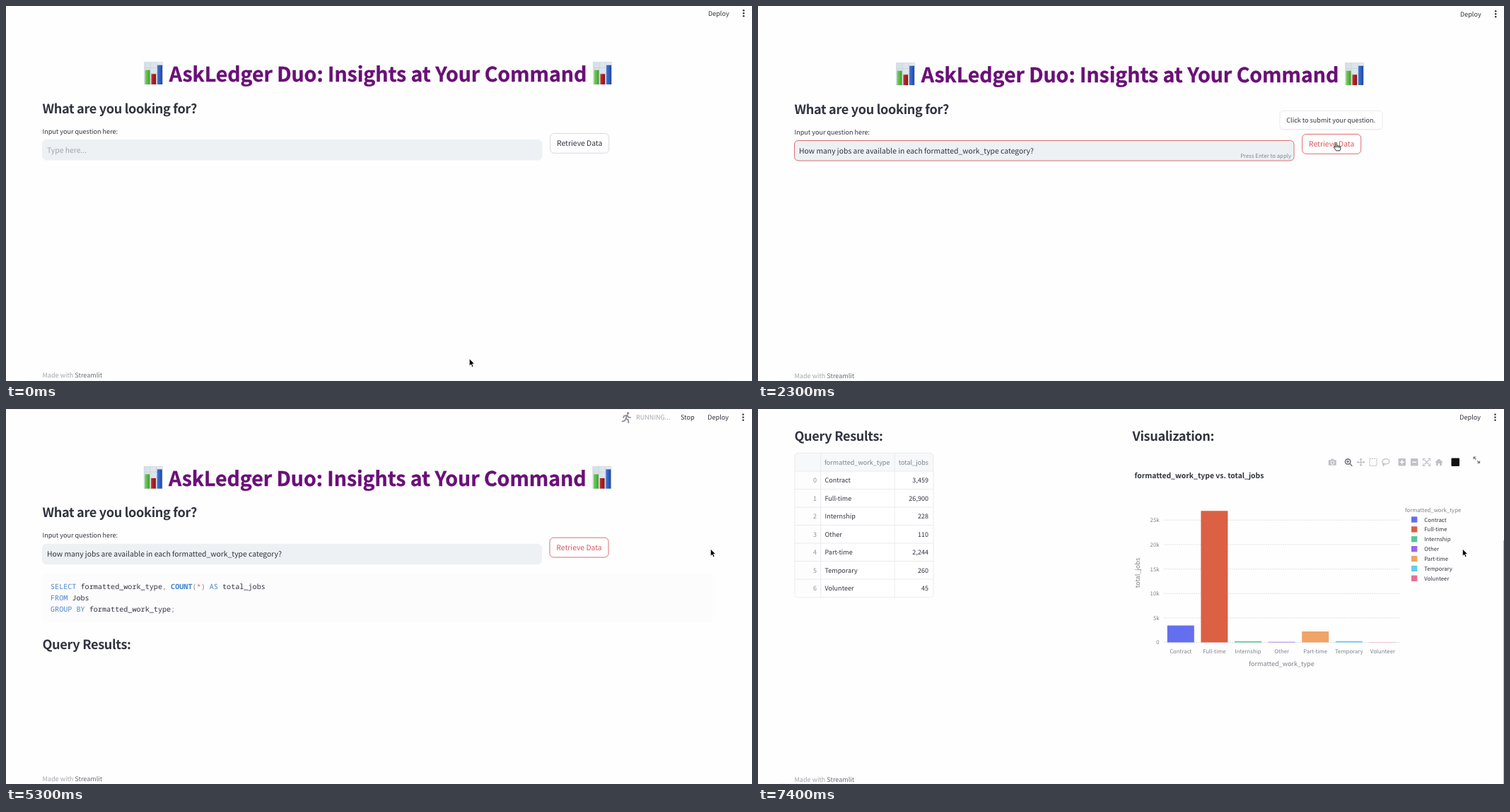
An HTML page for the animation above (8 s loop, 1055 px wide and 531 px high).

```html
<!DOCTYPE html>
<html lang="en">
<head>
<meta charset="utf-8">
<title>Data query app</title>
<style>
html, body { margin: 0; width: 100%; height: 100%; overflow: hidden; background: #fefefe; }
svg { display: block; width: 1055px; height: 531px; }
text {
  font-family: "Noto Sans CJK SC", "Noto Sans CJK JP", "Noto Sans CJK KR", Lato, sans-serif;
  text-rendering: geometricPrecision;
  white-space: pre;
}
text.code { font-family: "Noto Sans Mono", "DejaVu Sans Mono", monospace; }
.scene { visibility: hidden; }
.scene.on { visibility: visible; }
</style>
</head>
<body>
<svg id="stage" viewBox="0 0 1055 531" xmlns="http://www.w3.org/2000/svg"></svg>
<script>
const INK = '#31333f', GREY = '#7f8189', RED = '#d5565a', RIM = '#db6d70', KEY = '#4c86c9';
const PURPLE = '#6a1077';
const SIZE = { title: 28.5, head: 18.15, body: 10.37, label: 9.07, tiny: 7.78 };

const attrs = o => Object.entries(o).map(([k, v]) => ` ${k}="${v}"`).join('');
const text = (x, y, str, size, fill = INK, more = {}) =>
  `<text${attrs({ x, y, 'font-size': size, fill, ...more })}>${str}</text>`;
const rect = (x, y, width, height, fill, more = {}) =>
  `<rect${attrs({ x, y, width, height, fill, ...more })}/>`;
const path = (d, more = {}) => `<path${attrs({ d, fill: 'none', ...more })}/>`;
const group = (x, y, body) => `<g transform="translate(${x} ${y})">${body}</g>`;
const END = { 'text-anchor': 'end' }, MID = { 'text-anchor': 'middle' };

const heading = (x, y, str) =>
  text(x, y, str, SIZE.head, INK, { 'font-weight': 600, 'letter-spacing': -0.35 });

const chartIcon = (x, y) => group(x, y,
  rect(0.5, 0.5, 26, 31.5, 'url(#panel)', { stroke: '#cbd3db', 'stroke-width': 0.6 }) +
  path('M1 8.5H26M1 16.5H26M1 24.5H26M9 1V32M18 1V32', { stroke: '#c3ced8', 'stroke-width': 0.6 }) +
  rect(1.7, 11.7, 6.8, 20.3, 'url(#green)') +
  rect(10.5, 17.3, 6.7, 14.7, 'url(#red)') +
  rect(19, 4.7, 7.1, 27.3, 'url(#blue)'));

const arrow = (x, y) => group(x, y, path(
  'M0 0V10.6L2.4 8.4L4 12.2L5.9 11.4L4.3 7.7H7.5Z',
  { fill: '#000', stroke: '#fff', 'stroke-width': 0.9, 'stroke-linejoin': 'round' }));

const hand = (x, y) => group(x, y, path(
  'M2.5 7V1.2Q2.5 0 3.5 0T4.5 1.2V4.5Q5.5 3.8 6.3 4.9Q7.4 4.2 8.1 5.4Q9.7 5 9.8 6.6V8.6Q9.6 10 8.9 11.6H3.6Q2.8 9.9 .5 7.4Q-.2 6.2 1 6Q1.8 6 2.5 7ZM4.5 4.5V7M6.3 5V7.2M8.1 5.4V7.4',
  { fill: '#fff', stroke: '#222', 'stroke-width': 0.95, 'stroke-linejoin': 'round' }));

const runner = group(871, 4,
  '<circle cx="8.6" cy="2" r="1.8" fill="#8d8f96"/>' +
  path('M7.6 4.6L5.6 9.6M7.4 5L3.5 5.6L2 8M7.6 5L9.6 7.8L12 8.2M5.6 9.6L9 11.6L9.4 15.4M5.6 9.6L4 12.6L.6 13.6',
    { stroke: '#8d8f96', 'stroke-width': 1.8, 'stroke-linecap': 'round', 'stroke-linejoin': 'round' }));

const menu = (x, y) => text(x, y + 3.4, 'Deploy', SIZE.label) +
  [-4, 0, 4].map(d => `<circle cx="${x + 50.2}" cy="${y + d}" r="1.25" fill="${INK}"/>`).join('');

const footer = y => text(51.5, y,
  `Made with <tspan fill="#6c6e78">Streamlit</tspan>`, SIZE.label, '#a4a6ad');

// Form shared by the first three scenes; dx shifts the right-hand parts.
function form(dy, dx, { question, active, hot }) {
  const tone = hot ? RED : INK;
  return group(0, dy,
    chartIcon(195 + dx / 2, 79) + chartIcon(830 + dx, 79) +
    text(526 + dx, 107.3, 'AskLedger Duo: Insights at Your Command', SIZE.title, PURPLE,
      { ...MID, 'font-weight': 700, 'letter-spacing': -0.05, stroke: PURPLE, 'stroke-width': 0.35 }) +
    heading(51.5, 151.8, 'What are you looking for?') +
    text(51.5, 180.6, 'Input your question here:', SIZE.label) +
    rect(51.5, 189.5, 706.5 + dx, 28.5, '#edf1f4',
      { rx: 5.5, stroke: active ? RIM : '#edf1f4', 'stroke-width': 1 }) +
    text(58, 207.6, question || 'Type here...', SIZE.body, question ? INK : '#a1a4ab') +
    (active ? text(754, 214.2, 'Press Enter to apply', SIZE.tiny, '#82858d', END) : '') +
    rect(769.7 + dx, 180.5, 83, 27.8, '#fff',
      { rx: 5.5, stroke: hot ? RIM : '#d8d9dc', 'stroke-width': 1 }) +
    text(811.2 + dx, 198.3, 'Retrieve Data', SIZE.body, tone, MID));
}

const tooltip =
  rect(738, 149.5, 145, 26.5, '#000', { rx: 5, opacity: 0.04 }) +
  rect(738, 148.5, 145, 26, '#fff', { rx: 5, stroke: '#e9eaed', 'stroke-width': 1 }) +
  text(747.3, 164.9, 'Click to submit your question.', SIZE.label);

function sql() {
  const span = (str, fill, bold) =>
    `<tspan fill="${fill}"${bold ? ' font-weight="700"' : ''}>${str}</tspan>`;
  const key = str => span(str, KEY), mark = str => span(str, '#85888f');
  const lines = [
    key('SELECT') + ' formatted_work_type' + mark(',') + ' ' + span('COUNT', '#3c80d2', true) +
      mark('(') + span('*', '#dc7a45') + mark(')') + ' ' + key('AS') + ' total_jobs',
    key('FROM') + ' Jobs',
    key('GROUP BY') + ' formatted_work_type' + mark(';')
  ];
  return rect(51.5, 232.5, 948, 70.5, '#fcfcfd', { rx: 5 }) +
    lines.map((s, i) => text(63, 254.6 + i * 16.1, s, 10.13, INK, { class: 'code' })).join('');
}

const jobs = [
  ['Contract', 3459, '#646ff0'],
  ['Full-time', 26900, '#db6044'],
  ['Internship', 228, '#56c59b'],
  ['Other', 110, '#9868e6'],
  ['Part-time', 2244, '#f0a466'],
  ['Temporary', 260, '#66cdeb'],
  ['Volunteer', 45, '#e56f92']
];

function table() {
  const line = { stroke: '#e8e9ed', 'stroke-width': 0.9 };
  let out = rect(52, 62.3, 196, 204.5, '#fff', { rx: 4.5 }) +
    path('M52 88V66.8Q52 62.3 56.5 62.3H243.5Q248 62.3 248 66.8V88Z', { fill: '#f7f8fa' }) +
    rect(52.3, 88, 36.5, 174, '#fdfdfd') +
    text(94, 78.6, 'formatted_work_type', SIZE.label, GREY) +
    text(241, 78.6, 'total_jobs', SIZE.label, GREY, END);
  jobs.forEach(([name, n], i) => {
    const y = 88 + i * 25.5;
    out += path(`M52 ${y}H248`, line) +
      text(83, y + 16, i, SIZE.label, '#92949c', END) +
      text(94.5, y + 16, name, SIZE.label) +
      text(241, y + 16, n.toLocaleString('en-US'), SIZE.label, INK, END);
  });
  return out + path('M88.8 62.3V266.8M193.2 62.3V266.8', line) +
    rect(52, 62.3, 196, 204.5, 'none', { rx: 4.5, ...line });
}

function chart() {
  const base = 330.5, unit = 34.62 / 5000;
  let out = text(532.5, 98, 'formatted_work_type vs. total_jobs', SIZE.body, INK,
    { 'font-weight': 600 });
  for (let k = 0; k <= 25; k += 5) {
    const y = base - k * 1000 * unit;
    out += path(`M574 ${y}H908`, { stroke: '#dcdee3', 'stroke-width': 0.9, 'stroke-dasharray': '2 1' }) +
      text(567.5, y + 2.9, k ? k + 'k' : 0, SIZE.tiny, GREY, END);
  }
  jobs.forEach(([name, n, fill], i) => {
    const x = 597.8 + i * 47.6, y = 156.6 + i * 13.87;
    out += rect(x - 19, base - n * unit, 38, n * unit, fill) +
      text(x, 346, name, SIZE.tiny, GREY, MID) +
      rect(924, y - 4.2, 8.3, 8.3, fill) +
      text(942.3, y + 3, name, SIZE.tiny);
  });
  return out + text(915, 145.8, 'formatted_work_type', SIZE.tiny, GREY) +
    text(740.5, 364.2, 'formatted_work_type', SIZE.label, GREY, MID) +
    text(0, 0, 'total_jobs', SIZE.label, GREY, { ...MID, transform: 'translate(540 232) rotate(-90)' });
}

function toolbar() {
  const c = '#bfc1c6', line = { stroke: c, 'stroke-width': 1.3 };
  const at = (x, body) => group(x, 75.3, body);
  return at(812.3,
      path('M-5.5-3H-2.5L-1.5-4.5H1.5L2.5-3H5.5V4.5H-5.5Z', { fill: c }) +
      '<circle cy=".7" r="2.3" fill="none" stroke="#fff"/>') +
    at(835,
      '<circle cx="-.8" cy="-.8" r="3.7" fill="none" stroke="#777a82" stroke-width="1.7"/>' +
      path('M2 2L5.4 5.4M-2.6-.8H1M-.8-2.6V1', { stroke: '#777a82', 'stroke-width': 1.6 })) +
    at(852.6,
      path('M-5 0H5M0-5V5', line) +
      path('M-6 0L-3.4-2V2ZM6 0L3.4-2V2ZM0-6L-2-3.4H2ZM0 6L-2 3.4H2Z', { fill: c })) +
    at(870, rect(-5, -5, 10, 10, 'none', { ...line, 'stroke-dasharray': '2 1' })) +
    at(887.5,
      '<ellipse cx=".4" cy="-1" rx="5" ry="3.6" fill="none" stroke="#bfc1c6" stroke-width="1.3"/>' +
      path('M-3.6 1.2Q-5 4-2 3.2Q-2.4 5-3.4 5.8', line)) +
    at(910.7, rect(-5.2, -5.2, 10.4, 10.4, c, { rx: 1 }) +
      path('M-3 0H3M0-3V3', { stroke: '#fff', 'stroke-width': 1.5 })) +
    at(928.2, rect(-5.2, -5.2, 10.4, 10.4, c, { rx: 1 }) +
      path('M-3 0H3', { stroke: '#fff', 'stroke-width': 1.5 })) +
    at(945.6, path('M-5-2V-5H-2M2-5H5V-2M5 2V5H2M-2 5H-5V2M-3.4-3.4L3.4 3.4M3.4-3.4L-3.4 3.4', line)) +
    at(963, path('M0-5L5.8.3H4V5H1.2V1.6H-1.2V5H-4V.3H-5.8Z', { fill: c })) +
    rect(980.5, 69.5, 11.5, 11.5, '#111', { rx: 1 }) +
    group(1016.3, 72.3,
      path('M-4.8-4.8H-.6L-4.8-.6ZM4.8 4.8H.6L4.8.6Z', { fill: '#777a82' }) +
      path('M-4-4L-.8-.8M4 4L.8.8', { stroke: '#777a82', 'stroke-width': 1.3 }));
}

const question = 'How many jobs are available in each formatted_work_type category?';
const edge = rect(30, 530, 1000, 1, '#f8f8f9');

const scenes = [
  { from: 0, body: edge + menu(993, 10.3) + form(0, 0, {}) + footer(525.8) + arrow(655.2, 499.2) },
  { from: 500, body: edge + menu(993, 11.2) + form(1, 0, { question, active: true, hot: true }) +
      tooltip + footer(526.8) + hand(814, 193.3) },
  { from: 3500, body: rect(0, 0, 1055, 1, '#f1f1f3') + runner +
      text(891, 15.2, 'RUNNING...', SIZE.label, '#a4a6ad') + text(954, 15.2, 'Stop', SIZE.label) +
      menu(992.3, 11.8) + form(1.7, -0.7, { question, hot: true }) + sql() +
      heading(51.5, 340, 'Query Results:') + footer(527) + arrow(996.3, 197.9) },
  { from: 6500, body: edge + menu(992.3, 11.8) + heading(51.5, 45, 'Query Results:') +
      heading(529.5, 45, 'Visualization:') + table() + toolbar() + chart() + footer(527.8) +
      rect(1053.8, 186, 1.2, 345, '#bcbdc0') + arrow(996.3, 197.9) }
];
const LOOP = 8000;

const shade = (id, ...stops) => `<linearGradient id="${id}">` +
  stops.map((c, i) => `<stop offset="${i / (stops.length - 1)}" stop-color="${c}"/>`).join('') +
  '</linearGradient>';

const stage = document.getElementById('stage');
stage.innerHTML = '<defs>' +
  shade('panel', '#d5dee6', '#e6ebf0') +
  shade('green', '#72cf58', '#5dbb45', '#3f9530') +
  shade('red', '#bf3434', '#a92020', '#861515') +
  shade('blue', '#4678d4', '#2f5fc3', '#21479b') + '</defs>' +
  scenes.map(s => `<g class="scene">${s.body}</g>`).join('');

const layers = [...stage.querySelectorAll('.scene')];
const start = performance.now();

function show(now) {
  const t = Math.max(0, now - start) % LOOP;
  const current = scenes.filter(s => s.from <= t).length - 1;
  layers.forEach((el, i) => el.classList.toggle('on', i === current));
  requestAnimationFrame(show);
}
show(start);
</script>
</body>
</html>
```
